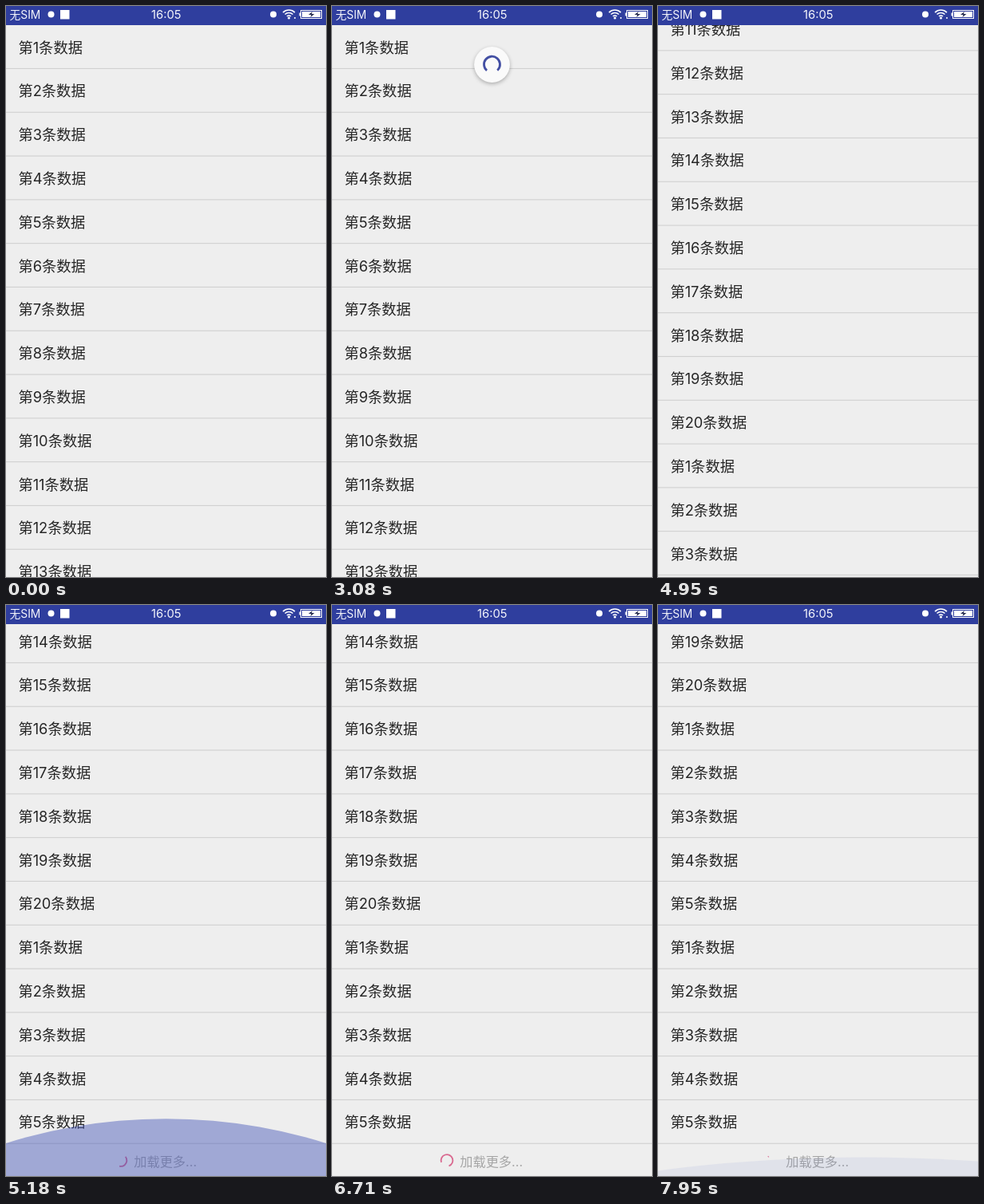
An HTML page with a canvas that plays this animation: 401 px wide and 716 px high, repeating every 8000 ms.

```html
<!DOCTYPE html>
<html lang="zh-CN">
<head>
<meta charset="utf-8">
<title>List refresh</title>
<style>
html, body { margin: 0; width: 100%; height: 100%; overflow: hidden; background: #eee; }
canvas { display: block; }
</style>
</head>
<body>
<canvas id="stage" width="401" height="716"></canvas>
<script>
const W = 401, H = 716, LOOP = 8000;
const BAR = 24, ROW = 54.8, LIST_TOP = 23.7;
const LOADED_AT = 7030;
const FONT = 'Inter, "Noto Sans CJK SC", "Noto Sans CJK JP", "Noto Sans CJK", sans-serif';
const INDIGO = '#3f51b5';
const ctx = document.getElementById('stage').getContext('2d');

const clamp = v => Math.min(1, Math.max(0, v));
const ease = x => x < 0.5 ? 4 * x ** 3 : 1 - (2 - 2 * x) ** 3 / 2;
const rad = deg => deg * Math.PI / 180;

// Linear interpolation through [time, value] keys.
function track(t, keys) {
  if (t <= keys[0][0]) return keys[0][1];
  for (let i = 1; i < keys.length; i++) {
    const [t0, v0] = keys[i - 1], [t1, v1] = keys[i];
    if (t <= t1) return v0 + (v1 - v0) * (t - t0) / (t1 - t0);
  }
  return keys[keys.length - 1][1];
}

const SCROLL = [
  [4640, 0], [4710, 57.6], [4790, 215], [4860, 372], [4940, 550], [5030, 718.4],
  [7490, 718.4], [7560, 766.3], [7640, 835], [7720, 897], [7790, 945], [7870, 982], [7920, 992.4]
];

function text(str, x, y, size, color, align = 'left') {
  ctx.font = `${size}px ${FONT}`;
  ctx.fillStyle = color;
  ctx.textAlign = align;
  ctx.fillText(str, x, y);
}

function disc(x, y, r, color) {
  ctx.fillStyle = color;
  ctx.beginPath();
  ctx.arc(x, y, r, 0, 2 * Math.PI);
  ctx.fill();
}

function arc(x, y, r, width, color, start, length) {
  ctx.strokeStyle = color;
  ctx.lineWidth = width;
  ctx.beginPath();
  ctx.arc(x, y, r, rad(start), rad(start + length));
  ctx.stroke();
}

// Arc that grows, then shrinks from its tail, while the whole ring turns.
function sweep(t, begin, angle, rate) {
  const cycles = (t - begin) / 1333, n = Math.floor(cycles), p = cycles - n;
  const tail = 270 * (n + ease(clamp(2 * p - 1)));
  const head = 270 * (n + ease(clamp(2 * p)));
  return [angle + rate * (t - begin) / 1000 + tail, head - tail + 8];
}

function drawFooter(t, top) {
  const [start, length] = t < LOADED_AT ? sweep(t, 4847, -103, 190) : sweep(t, 7930, 212, 190);
  arc(144, top + 21.2, 7.4, 1.8, '#d9688f', start, length);
  text('加载更多...', 160.3, top + 28.6, 16.2, '#a6a6a6');
}

function drawList(t) {
  const rows = t < LOADED_AT ? 25 : 30;
  const origin = LIST_TOP - track(t, SCROLL);
  for (let i = 0; i < rows; i++) {
    const y = origin + i * ROW;
    if (y < -ROW || y > H) continue;
    const n = i < 20 ? i + 1 : (i - 20) % 5 + 1;
    text(`第${n}条数据`, 15.4, y + 34.9, 18.3, '#262626');
    ctx.fillStyle = '#d0d0d0';
    ctx.fillRect(0, y + ROW - 0.6, W, 1.1);
  }
  const end = origin + rows * ROW;
  if (end < H) drawFooter(t, end);
}

function drawGlow(height, alpha, cx) {
  if (height <= 0) return;
  ctx.globalAlpha = alpha;
  ctx.fillStyle = INDIGO;
  const ry = 601 * height / 80.5;
  ctx.beginPath();
  ctx.ellipse(cx, H - height + ry, 601, ry, 0, 0, 2 * Math.PI);
  ctx.fill();
  ctx.globalAlpha = 1;
}

function drawEdgeGlow(t) {
  if (t > 5030 && t < 5570) {
    const k = t < 5180
      ? 1 - (1 - (t - 5030) / 150) ** 2
      : (1 - (t - 5180) / 390) ** 2;
    drawGlow(72.2 * k, 0.45 * Math.sqrt(k), W / 2);
  } else if (t > 7900) {
    const k = (t - 7900) / 50;
    drawGlow(23 * k, 0.074 * k, 258);
  }
}

function drawArrow(r, angle) {
  ctx.save();
  ctx.rotate(rad(angle));
  ctx.translate(r, 0);
  ctx.beginPath();
  ctx.moveTo(-5, 0);
  ctx.lineTo(5, 0);
  ctx.lineTo(0, 5);
  ctx.fillStyle = INDIGO;
  ctx.fill();
  ctx.restore();
}

function drawRefresh(t) {
  if (t < 870 || t > 3770) return;
  const scale = 1 - clamp((t - 3630) / 140);
  if (scale <= 0) return;
  const release = 1640;
  const back = 1 - clamp((t - release) / 200);
  const y = t < release
    ? track(t, [[870, 1.7], [1150, 55], [1350, 95], [1530, 118], [1640, 120]])
    : 73.5 + 46.5 * back * back;

  ctx.save();
  ctx.translate(W / 2, y);
  ctx.scale(scale, scale);
  ctx.save();
  ctx.shadowColor = 'rgba(0,0,0,.28)';
  ctx.shadowBlur = 5;
  ctx.shadowOffsetY = 1.8;
  disc(0, 0, 22.4, '#fafafa');
  ctx.restore();
  if (t < release) {
    const pull = clamp((y - 1.7) / 72);
    const start = -90 + 150 * (y / 120);
    ctx.globalAlpha = pull < 1 ? 0.3 + 0.2 * pull : 1;
    arc(0, 0, 10, 2.8, INDIGO, start, 288 * pull);
    drawArrow(10, start + 288 * pull);
  } else {
    arc(0, -0.3, 10, 2.8, '#434fa3', ...sweep(t, 2413.5, 22, 162));
  }
  ctx.restore();
}

function drawStatusBar() {
  ctx.fillStyle = '#2f3e9e';
  ctx.fillRect(0, 0, W, BAR);
  text('无SIM', 4.5, 16.2, 13.8, '#f4f5fb');
  text('16:05', 200.8, 16.4, 14.8, '#f4f5fb', 'center');

  disc(56.5, 10.5, 4, '#fff');
  ctx.fillRect(68, 5, 11.5, 11.5);
  disc(335, 10.5, 4, '#fff');

  for (const r of [3.5, 7, 10.5]) arc(354.5, 15.5, r, 1.6, '#fff', -135, 90);
  disc(354.5, 15, 1.6, '#fff');
  disc(362, 15, 1, '#fff');

  ctx.lineWidth = 1;
  ctx.strokeRect(369.5, 5.5, 26, 10);
  ctx.fillRect(371, 7, 23, 7);
  ctx.fillRect(367.5, 8.5, 2, 4);
  ctx.fillStyle = '#20264a';
  ctx.beginPath();
  for (const [x, y] of [[384, 7], [379, 11], [382.5, 11], [381.5, 14], [386.5, 10], [383, 10]]) ctx.lineTo(x, y);
  ctx.fill();
}

function draw(now) {
  const t = now % LOOP;
  ctx.fillStyle = '#eee';
  ctx.fillRect(0, 0, W, H);
  drawList(t);
  drawEdgeGlow(t);
  drawRefresh(t);
  drawStatusBar();
}

const began = performance.now();
function tick() {
  draw(performance.now() - began);
  requestAnimationFrame(tick);
}
tick();
</script>
</body>
</html>
```
